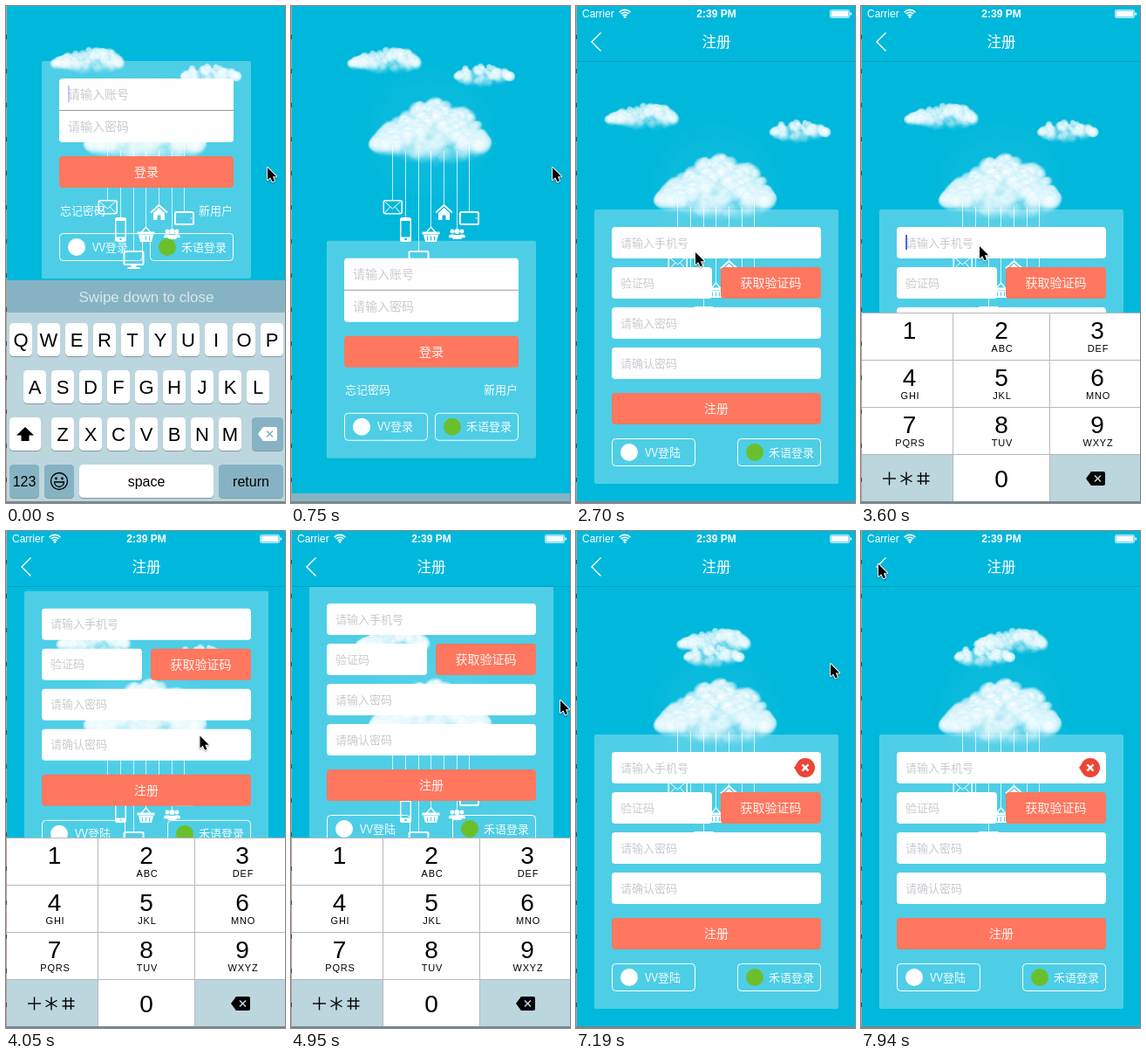
Write an HTML page with a canvas that moves like this. It is 320 px wide and 569 px high and loops after 8 s.

```html
<!DOCTYPE html>
<html lang="zh">
<head>
<meta charset="utf-8">
<title>登录与注册</title>
<style>
html, body { margin: 0; width: 100%; height: 100%; overflow: hidden; background: #00b8db; }
canvas { display: block; width: 100vw; height: 100vh; }
</style>
</head>
<body>
<canvas id="stage"></canvas>
<script>
const W = 320, H = 569, LOOP = 8000;
const BLUE = '#00b8db', CORAL = '#ff775e', KEY_BG = '#bcd6de', KEY_DARK = '#86b3c4';
const INK = 'rgba(255,255,255,.94)', HINT = '#cacad0';
const CJK = '"Noto Sans CJK SC", "Noto Sans CJK", sans-serif';
const LATIN = '"Liberation Sans", Arial, sans-serif';
const canvas = document.getElementById('stage');
const dpr = window.devicePixelRatio || 1;
canvas.width = W * dpr;
canvas.height = H * dpr;
const c = canvas.getContext('2d');

const clamp = v => Math.max(0, Math.min(1, v));
const ease = v => v * v * (3 - 2 * v);
const ramp = (t, a, b) => ease(clamp((t - a) / (b - a)));

const stepTime = t => t < 6740 ? Math.floor(t / 150) * 150 : 6740 + Math.floor((t - 6740) / 150) * 150;

function at(x, y, draw) {
  c.save();
  c.translate(x, y);
  draw();
  c.restore();
}

function text(s, x, cy, size, color, align = 'left', font = CJK, weight = 300) {
  c.font = `${weight} ${size}px ${font}`;
  c.textAlign = align;
  c.fillStyle = color;
  c.fillText(s, x, cy + size * 0.355);
}

function rect(x, y, w, h, color) {
  c.fillStyle = color;
  c.fillRect(x, y, w, h);
}

function box(x, y, w, h, r, fill, stroke) {
  c.beginPath();
  c.roundRect(x, y, w, h, r);
  if (fill) { c.fillStyle = fill; c.fill(); }
  if (stroke) { c.strokeStyle = stroke; c.stroke(); }
}

function path(...points) {
  c.beginPath();
  points.forEach(([x, y]) => c.lineTo(x, y));
}

function line(...points) { path(...points); c.stroke(); }

function shape(color, ...points) {
  path(...points);
  c.closePath();
  c.fillStyle = color;
  c.fill();
}

function dot(x, y, r, color) {
  c.beginPath();
  c.arc(x, y, r, 0, Math.PI * 2);
  c.fillStyle = color;
  c.fill();
}

function pen(color, width) {
  c.strokeStyle = color;
  c.lineWidth = width;
}

function cross(x, y, r) {
  [-1, 1].forEach(s => line([x - r, y - r * s], [x + r, y + r * s]));
}

// ---- clouds ----
// Puffs fill a skewed dome from top to bottom and thin out below.
function makeCloud({ w, up, down, skew, count, seed }) {
  const layer = document.createElement('canvas');
  layer.width = w * 2;
  layer.height = (up + down) * 2;
  const g = layer.getContext('2d');
  g.scale(2, 2);
  const rand = () => (seed = (seed * 16807) % 2147483647) / 2147483647;
  for (let i = 0; i < count; i++) {
    const q = i / count, u = rand(), r = w * (0.04 + 0.05 * rand());
    const dome = Math.sin(Math.PI * u ** skew) ** 0.7 * (0.86 + 0.14 * Math.abs(Math.sin(u * 13)));
    const x = r + (w - 2 * r) * u;
    const y = up - (up - r) * dome + q * (up + down - 2 * r) * dome;
    const a = 0.06 + 0.64 * (1 - q);
    const fill = g.createRadialGradient(x - r * 0.2, y - r * 0.35, 0, x, y, r);
    fill.addColorStop(0, `rgba(255,255,255,${a})`);
    fill.addColorStop(0.5, `rgba(244,252,255,${a})`);
    fill.addColorStop(0.85, `rgba(190,236,247,${a * 0.55})`);
    fill.addColorStop(1, 'rgba(190,236,247,0)');
    g.fillStyle = fill;
    g.fillRect(x - r, y - r, r * 2, r * 2);
  }
  // The left edge is x, the widest level is y.
  return (x, y) => c.drawImage(layer, x, y - up, w, up + down);
}

const bigCloud = makeCloud({ w: 144, up: 58, down: 28, skew: 1.2, count: 330, seed: 17 });
const cloudA = makeCloud({ w: 88, up: 23, down: 16, skew: 1.3, count: 130, seed: 41 });
const cloudB = makeCloud({ w: 72, up: 17, down: 15, skew: 0.8, count: 100, seed: 73 });

// ---- things hanging from the cloud, drawn from the end of their string ----
function envelope() {
  pen('#fff', 1.5);
  box(-10.3, 0.8, 21, 15, 2, null, '#fff');
  c.lineWidth = 1;
  line([-9, 2], [0, 10], [9, 2]);
  [-9, 9].forEach(x => line([x, 15], [x / 3, 8]));
}

function phone() {
  box(-6.5, 0, 13, 28, 2.5, '#fff');
  rect(-5, 4, 10, 18.5, BLUE);
  dot(0, 25, 1.3, BLUE);
}

function screen(w, h) {
  pen('#fff', 2);
  box(-w / 2, 1, w, h, 1.5, null, '#fff');
}

function monitor() {
  screen(22, 15);
  rect(-3, 17, 6, 3, '#fff');
  rect(-7, 19, 14, 2, '#fff');
}

function basket() {
  pen('#fff', 1.4);
  line([-6, 7], [0, 0], [6, 7]);
  rect(-10, 5.5, 20, 3, '#fff');
  shape('#fff', [-8.5, 9], [8.5, 9], [6.5, 17], [-6.5, 17]);
  for (let x = -4; x <= 4; x += 4) rect(x - 0.5, 10.5, 1, 5, BLUE);
}

function house() {
  pen('#fff', 2);
  line([-9.5, 9.5], [0, 1], [9.5, 9.5]);
  shape('#fff', [-6.5, 10], [0, 4], [6.5, 10], [6.5, 18], [-6.5, 18]);
  rect(-2, 12.5, 4, 5.5, BLUE);
}

function people() {
  for (const side of [-1, 1, 0]) {
    const r = side ? 2.4 : 3.1;
    dot(side * 5.5, 3, r, '#fff');
    box(side * 5.5 - r * 1.6, 4 + r, r * 3.2, r * 1.6, [r, r, 0, 0], '#fff');
  }
}

function tablet() {
  screen(21, 14);
  dot(8, 8, 0.8, '#fff');
}

const hanging = [[222, envelope], [242, phone], [280, monitor], [253, basket], [227, house], [255, people], [235, tablet]];

function scenery(top, ax, bx) {
  rect(0, 0, W, H, BLUE);
  at(0, top, () => {
    const glow = c.createRadialGradient(160, 145, 55, 160, 145, 78);
    glow.addColorStop(0, 'rgba(90,210,240,.1)');
    glow.addColorStop(1, 'rgba(90,210,240,0)');
    rect(80, 65, 160, 160, glow);
    bigCloud(88, 159);
    cloudA(ax - 44, 66);
    cloudB(bx - 36, 81);
    hanging.forEach(([y, draw], i) => {
      const x = Math.floor(116.6 + 14.7 * i) + 0.5;
      pen('rgba(255,255,255,.75)', 1);
      line([x, i % 6 ? 166 : 159], [x, y]);
      at(x, y, draw);
    });
  });
}

// ---- form parts ----
const panel = (x, y, w, h) => box(x, y, w, h, 2, 'rgba(255,255,255,.3)');

function field(x, y, w, label) {
  box(x, y, w, 36, 4, '#fff');
  text(label, x + 10, y + 18, 13, HINT);
}

function button(x, y, w, label) {
  box(x, y, w, 36, 4, CORAL);
  text(label, x + w / 2, y + 18, 14, INK, 'center');
}

function partners(left, right, y, labels) {
  [[left, '#fff', 38], [right, '#6cbf2c', 36]].forEach(([x, color, dx], i) => {
    c.lineWidth = 1;
    box(x + 0.5, y + 0.5, 95, 31, 4, null, '#fff');
    dot(x + 20, y + 16, 10, color);
    text(labels[i], x + dx, y + 16, 13, INK);
  });
}

function loginForm(y, caret) {
  panel(41, y, 240, 249);
  box(61, y + 20, 200, 73, 4, '#fff');
  rect(61, y + 56, 200, 1, '#9a9a9a');
  ['请输入账号', '请输入密码'].forEach((s, i) => text(s, 71, y + 38 + 37 * i, 14, HINT));
  if (caret) rect(71, y + 28, 2, 19, 'rgba(66,107,242,.35)');
  button(61, y + 109, 200, '登录');
  text('忘记密码', 62, y + 171, 13, INK);
  text('新用户', 260, y + 171, 13, INK, 'right');
  partners(61, 165, y + 197, ['VV登录', '禾语登录']);
}

function clearBadge(x, y) {
  dot(x, y, 11, '#ee4436');
  shape('#ee4436', [x - 13, y], [x - 6, y - 9], [x - 6, y + 9]);
  pen('#fff', 2.4);
  cross(x, y, 3.6);
}

function registerForm(y, caret, badge) {
  panel(21, y, 280, 314);
  ['请输入手机号', '验证码', '请输入密码', '请确认密码'].forEach((s, i) =>
    field(41, y + 20 + 46 * i, i === 1 ? 115 : 240, s));
  button(166, y + 66, 115, '获取验证码');
  button(41, y + 210, 240, '注册');
  partners(41, 185, y + 262, ['VV登陆', '禾语登录']);
  if (caret) rect(51, y + 29, 2, 17, '#426bf2');
  if (badge) clearBadge(263, y + 38);
}

function navBar() {
  rect(0, 63, W, 1, '#059fc0');
  text('Carrier', 7, 9, 12, '#fff', 'left', LATIN, 400);
  text('2:39 PM', 161, 9, 12, '#fff', 'center', LATIN, 700);
  pen('#fff', 1.6);
  for (let r = 3.5; r < 10; r += 2.8) {
    c.beginPath();
    c.arc(56, 13.5, r, -Math.PI * 0.75, -Math.PI * 0.25);
    c.stroke();
  }
  dot(56, 12.6, 1.4, '#fff');
  c.lineWidth = 0.7;
  box(291.5, 4.5, 22, 9, 1.5, null, '#fff');
  rect(292.5, 5.5, 20, 7, '#fff');
  rect(314.5, 7.5, 1.5, 3, '#fff');
  c.lineWidth = 1.4;
  line([28.5, 30.5], [18, 41], [28.5, 51.5]);
  text('注册', 161, 41, 16.5, '#fff', 'center', CJK, 400);
}

// ---- keyboards ----
function key(x, y, w, label, size, dark) {
  box(x, y + 1, w, 38, 4.5, '#82989f');
  box(x, y, w, 38, 4.5, dark ? KEY_DARK : '#fff');
  if (label) text(label, x + w / 2, y + 19, size, '#000', 'center', LATIN, 400);
}

function eraser(x, y, fill, mark) {
  box(x - 6, y - 8, 17, 16, 2, fill);
  shape(fill, [x - 11, y], [x - 5, y - 8], [x - 5, y + 8]);
  pen(mark, 1.6);
  cross(x + 2.5, y, 3.5);
}

function smiley(x, y) {
  pen('#000', 1.3);
  [[y, 9.5, 2], [y + 1, 5.5, 1]].forEach(([cy, r, turn]) => {
    c.beginPath();
    c.arc(x, cy, r, 0, Math.PI * turn);
    c.closePath();
    c.stroke();
  });
  [-3.5, 3.5].forEach(d => dot(x + d, y - 3, 1.4, '#000'));
}

function letterPad() {
  rect(0, 314, W, 253, KEY_BG);
  rect(0, 314, W, 37, KEY_DARK);
  text('Swipe down to close', 161, 333, 17, '#d9e7ec', 'center', LATIN, 400);
  ['QWERTYUIOP', 'ASDFGHJKL', 'ZXCVBNM'].forEach((row, r) =>
    [...row].forEach((s, i) => key(164 + (i - row.length / 2) * 32, 363 + r * 54, 26, s, 22)));
  key(4, 471, 36);
  shape('#000', [22, 482], [32, 491.5], [12, 491.5]);
  rect(17.5, 491, 9, 7, '#000');
  key(282, 471, 36, '', 0, true);
  eraser(300, 490, '#fff', KEY_DARK);
  key(4, 525, 34, '123', 16, true);
  key(44, 525, 34, '', 0, true);
  smiley(61, 544);
  key(84, 525, 154, 'space', 16);
  key(244, 525, 74, 'return', 16, true);
}

function symbols(y) {
  pen('#000', 1.4);
  const stroke = (x, r, angle) => {
    const dx = Math.cos(angle) * r, dy = Math.sin(angle) * r;
    line([x - dx, y - dy], [x + dx, y + dy]);
  };
  [0, 2].forEach(k => stroke(32.5, 7.5, k * Math.PI / 4));
  [1, 3, 5].forEach(k => stroke(52, 7.5, k * Math.PI / 6));
  [-3, 3].forEach(d => {
    line([71.5 + d, y - 7], [71.5 + d, y + 7]);
    line([64.5, y + d], [78.5, y + d]);
  });
}

function numberPad() {
  const centers = [55.5, 161, 271];
  rect(0, 351, W, 216, '#fff');
  rect(0, 513, 105, 54, KEY_BG);
  rect(216, 513, 104, 54, KEY_BG);
  for (let y = 351; y < 567; y += 54) rect(0, y, W, 1, '#b5b9bb');
  [105, 216].forEach(x => rect(x, 351, 1, 216, '#b5b9bb'));
  ['', 'ABC', 'DEF', 'GHI', 'JKL', 'MNO', 'PQRS', 'TUV', 'WXYZ'].forEach((s, i) => {
    const x = centers[i % 3], y = 371.5 + Math.floor(i / 3) * 54;
    text(i + 1, x, y, 28, '#000', 'center', LATIN, 400);
    c.letterSpacing = '0.8px';
    text(s, x + 1, y + 21, 11, '#000', 'center', LATIN, 400);
    c.letterSpacing = '0px';
  });
  text('0', 161, 541, 28, '#000', 'center', LATIN, 400);
  symbols(541);
  eraser(269, 541, '#000', KEY_BG);
}

// ---- pointer ----
const moves = [[900, 1650, 245, 449], [2000, 2550, 137, 282], [3000, 3400, 136, 275],
  [3700, 4400, 309, 194], [4950, 5200, 301, 156], [7100, 7940, 20, 38]];

function pointer(t) {
  let x = 300, y = 185;
  for (const [from, to, tx, ty] of moves) {
    const p = ramp(t, from, to);
    x += (tx - x) * p;
    y += (ty - y) * p;
  }
  at(x, y, () => {
    c.scale(0.93, 0.93);
    path([0, 0], [0, 15], [3.5, 12], [6, 17.5], [8.6, 16.4], [6.3, 11], [11, 11]);
    c.closePath();
    c.lineJoin = 'round';
    c.shadowColor = 'rgba(0,0,0,.35)';
    c.shadowBlur = 2 * dpr;
    c.shadowOffsetY = dpr;
    pen('#fff', 2);
    c.stroke();
    c.shadowColor = 'transparent';
    c.fillStyle = '#000';
    c.fill();
  });
}

// ---- pages ----
function loginPage(t) {
  const down = ramp(t, 400, 800);
  scenery(0, 94 + t * 0.0183, 235 - t * 0.0178);
  loginForm(63 + 215 * down, t < 150);
  if (down < 1) at(0, 255 * down, letterPad);
}

function registerPage(t) {
  const up = ramp(t, 3650, 4100) - ramp(t, 6740, 7150);
  const pad = ramp(t, 3060, 3420) - ramp(t, 6740, 7100);
  const caret = t >= 3200 && t < 6800 && Math.floor((t - 3200) / 500) % 2 === 0;
  const s = (t - 2700) / 1000;
  scenery(64, 76 + 18.4 * s, 257 - 22 * s);
  registerForm(233 - 170 * up, caret, t >= 6850);
  navBar();
  if (pad > 0) at(0, 216 * (1 - pad), numberPad);
}

function desktopEdge() {
  rect(0, 0, 1, H, '#b9a091');
  for (let y = 22; y < 540; y += 39) rect(0, y + (y * 7) % 13, 1, 5, '#4c4643');
  rect(0, 567, W, 2, '#75898f');
}

function draw(t) {
  c.setTransform(dpr, 0, 0, dpr, 0, 0);
  const push = ramp(t, 1800, 2100);
  if (push < 1) at(-96 * push, 0, () => loginPage(t));
  if (push > 0) at(W * (1 - push), 0, () => {
    c.beginPath();
    c.rect(0, 0, W, H);
    c.clip();
    registerPage(t);
  });
  desktopEdge();
  pointer(t);
}

const start = performance.now();
function tick() {
  draw(stepTime((performance.now() - start) % LOOP));
  requestAnimationFrame(tick);
}
tick();
</script>
</body>
</html>
```
